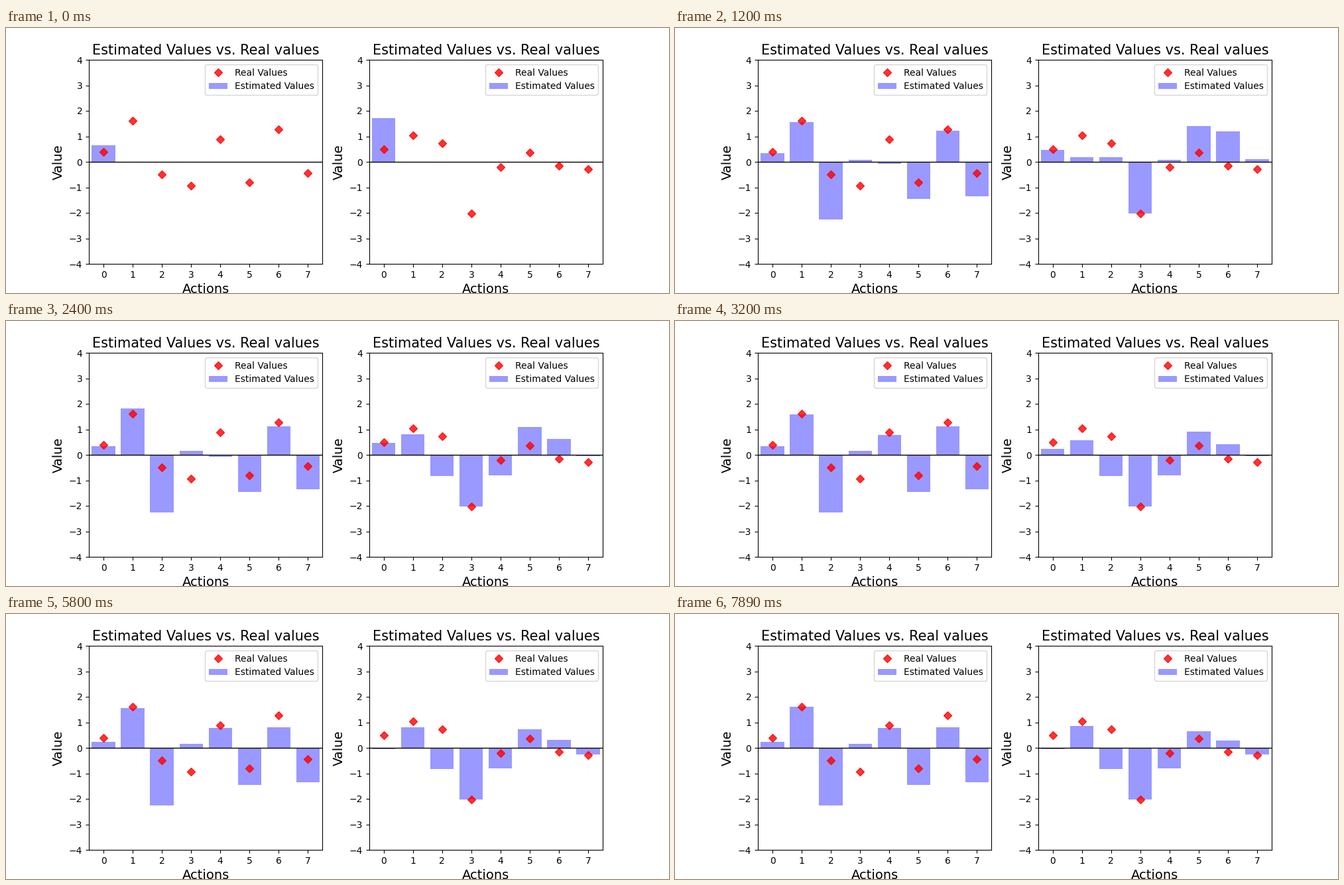
Recreate the animation shown at these times as a matplotlib script. Size 1000x400 px, loop 7.99 s.

```python
import numpy as np
import matplotlib.pyplot as plt
from matplotlib.animation import FuncAnimation

LOOP_MS, INTERVAL = 7990, 47
FRAMES = LOOP_MS // INTERVAL
STEPS = 82
ARMS = 8
steps = np.arange(STEPS)

# Steps last 100 ms; late in the loop every fourth one is short.
durations = np.full(STEPS, 100)
durations[69:81:4] = 30
ends = np.cumsum(durations)

REAL_LEFT = [0.39, 1.61, -0.49, -0.93, 0.89, -0.80, 1.28, -0.44]
REAL_RIGHT = [0.50, 1.04, 0.73, -2.02, -0.20, 0.37, -0.15, -0.28]


def jump(first, *changes):
    """Hold a value, switching hard at each (step, value)."""
    path = np.full(STEPS, float(first))
    for step, value in changes:
        path[step:] = value
    return path


def drift(*points):
    """Run straight between (step, value) points."""
    return np.interp(steps, *zip(*points))


def settle(begin, first, last, rate):
    """Approach the last value exponentially."""
    return last + (first - last) * np.exp((begin - steps) / rate)


PATHS_LEFT = [
    jump(0.65, (11, 0.34), (51, 0.23)),
    drift((1, 2.34), (12, 1.56), (24, 1.82), (32, 1.58), (70, 1.56), (81, 1.61)),
    jump(-2.25),
    jump(0.08, (20, 0.16)),
    jump(-0.07, (28, 0.78)),
    jump(-1.45),
    jump(1.6, (10, 1.22), (18, 1.12), (37, 0.81)),
    jump(-1.34),
]
PATHS_RIGHT = [
    jump(1.72, (8, 0.47), (21, 0.39), (29, 0.23), (53, -0.04)),
    drift((16, 0.18), (23, 0.81), (31, 0.55), (47, 0.76), (70, 0.84), (81, 0.86)),
    jump(0.18, (16, -0.82)),
    jump(-2.02),
    jump(0.08, (19, -0.80)),
    settle(5, 1.58, 0.62, 23),
    settle(6, 1.93, 0.29, 10),
    jump(0.10, (20, -0.04), (34, -0.25)),
]


def play(paths):
    """Try every arm once, then update the one furthest off its path."""
    paths = np.array(paths)
    history = np.zeros((STEPS, ARMS))
    current = np.zeros(ARMS)
    for step in steps:
        target = paths[:, step]
        arm = step if step < ARMS else np.argmax(abs(target - current))
        current[arm] = target[arm]
        history[step] = current
    return history


def draw_panel(ax, real):
    ax.plot(range(ARMS), real, "D", color="red", alpha=0.8,
            label="Real Values")
    ax.axhline(0, color="black", lw=1)
    bars = ax.bar(range(ARMS), np.zeros(ARMS), color="blue", alpha=0.4,
                  label="Estimated Values")
    ax.set_xlim(-0.5, ARMS - 0.5)
    ax.set_ylim(-4, 4)
    ax.set_xticks(range(ARMS))
    ax.set_title("Estimated Values vs. Real values", fontsize=15)
    ax.set_xlabel("Actions", fontsize=14)
    ax.set_ylabel("Value", fontsize=14)
    ax.legend(loc="upper right")
    return bars


fig, (left, right) = plt.subplots(1, 2, figsize=(10, 4), dpi=100)
panels = [
    (draw_panel(left, REAL_LEFT), play(PATHS_LEFT)),
    (draw_panel(right, REAL_RIGHT), play(PATHS_RIGHT)),
]


def update(frame):
    time = (frame + 1) * INTERVAL - 1
    step = np.searchsorted(ends, time, side="right")
    for bars, history in panels:
        for bar, value in zip(bars, history[step]):
            bar.set_height(value)
    return [bar for bars, _ in panels for bar in bars]


anim = FuncAnimation(fig, update, frames=FRAMES, interval=INTERVAL,
                     repeat=True, repeat_delay=0)
plt.show()
```
